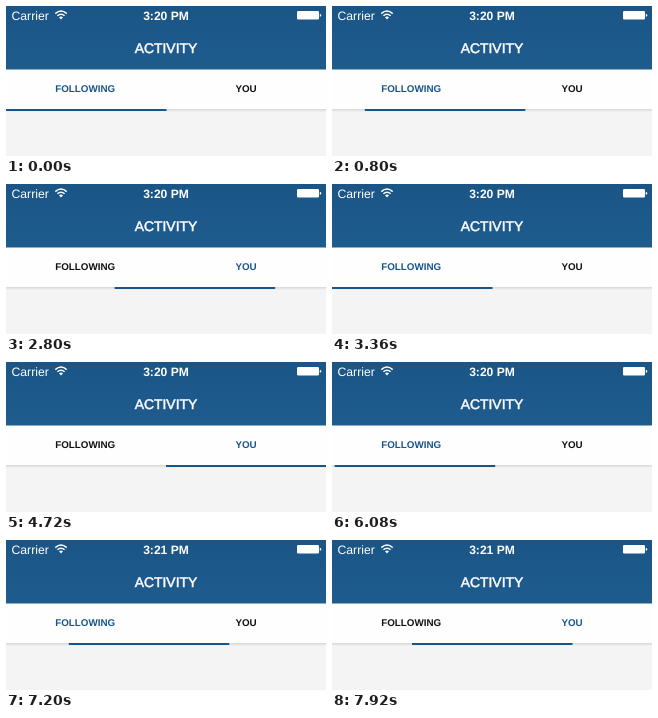
An HTML page that plays this animation: 320 by 150 pixels, repeating every 8 s.

```html
<!DOCTYPE html>
<html lang="en">
<head>
<meta charset="utf-8">
<title>Activity tabs</title>
<style>
  html, body { margin: 0; width: 100%; height: 100%; overflow: hidden; background: #f4f4f4; }
  svg { display: block; width: 100%; height: 100%; }
  text { font-family: "Liberation Sans", Arial, sans-serif; fill: #fff; text-rendering: geometricPrecision; }
  .mid { text-anchor: middle; }
  .medium { stroke: #fff; stroke-width: .5; }
  .tab { font-size: 9.8px; font-weight: bold; fill: #111; }
  .tab.active { fill: #17558a; }
</style>
</head>
<body>
<svg viewBox="0 0 320 150" preserveAspectRatio="none">
  <defs>
    <linearGradient id="header" x2="0" y2="1">
      <stop offset="0" stop-color="#1a5586"/>
      <stop offset="1" stop-color="#1f5c8e"/>
    </linearGradient>
    <linearGradient id="shadow" x2="0" y2="1">
      <stop offset="0" stop-color="#d6d6d6"/>
      <stop offset="1" stop-color="#f4f4f4"/>
    </linearGradient>
  </defs>
  <rect width="320" height="150" fill="#f4f4f4"/>
  <rect y="63" width="320" height="40" fill="#fefefe"/>
  <rect width="320" height="63.5" fill="url(#header)"/>
  <rect y="103" width="320" height="3" fill="url(#shadow)"/>

  <text x="5.5" y="14" font-size="12.2">Carrier</text>
  <g fill="none" stroke="#fff" stroke-width="1.5">
    <path d="M49.3 7.6Q55 2.4 60.7 7.6M51.4 9.8Q55 6.6 58.6 9.8"/>
    <path d="M53 11.2Q55 9.6 57 11.2L55 13.4Z" fill="#fff" stroke="none"/>
  </g>
  <text id="clock" class="mid" x="160" y="13.7" font-size="12.1" font-weight="bold">3:20 PM</text>
  <rect x="291" y="5" width="22" height="8.5" rx="1.2" fill="#fff"/>
  <path d="M313.8 7.7q1.4 .3 1.4 1.6t-1.4 1.6z" fill="#fff"/>

  <text class="mid medium" x="160" y="47" font-size="13.9">ACTIVITY</text>
  <text class="mid tab" x="79.2" y="86.4">FOLLOWING</text>
  <text class="mid tab" x="240" y="86.4">YOU</text>
  <rect id="bar" y="103" width="160.5" height="2" fill="#17558a"/>
</svg>
<script>
const LOOP = 8000, STEP = 80, TAB = 160, MINUTE_AT = 6640;

const linear = p => p;
const accelerate = p => p * p;
const smooth = p => p * p * (3 - 2 * p);
const settle = p => 1 - (1 - p) ** 2.5;
const swipe = p => 1 - (1 - p ** 1.5) ** 3.5;

// A move selects its tab once its progress reaches `commit`
const moves = [
  { start: 320, end: 1520, to: 82, ease: linear },
  { start: 1520, end: 1840, to: TAB, ease: settle, tab: 1, commit: .7 },
  { start: 2640, end: 3360, to: 0, ease: swipe, tab: 0, commit: .7 },
  { start: 4000, end: 4720, to: TAB, ease: swipe, tab: 1, commit: .7 },
  { start: 5000, end: 5360, to: 0, ease: smooth, tab: 0, commit: 0 },
  { start: 6000, end: 6880, to: 113, ease: smooth },
  { start: 6880, end: 7360, to: 0, ease: accelerate },
  { start: 7720, end: 8120, to: TAB, ease: smooth, tab: 1, commit: 0 }
];

const bar = document.getElementById('bar');
const clock = document.getElementById('clock');
const tabs = document.querySelectorAll('.tab');

function stateAt(t) {
  let x = 0, selected = 0;
  for (const { start, end, to, ease, tab, commit } of moves) {
    if (t < start) break;
    const p = Math.min(1, (t - start) / (end - start));
    x += (to - x) * ease(p);
    if (p >= commit) selected = tab;
  }
  return { x, selected };
}

function draw(now) {
  const t = Math.floor((now % LOOP) / STEP) * STEP;
  const { x, selected } = stateAt(t);
  bar.setAttribute('x', x);
  tabs.forEach((tab, i) => tab.classList.toggle('active', i === selected));
  clock.textContent = t < MINUTE_AT ? '3:20 PM' : '3:21 PM';
}

const start = performance.now();
function tick() {
  draw(performance.now() - start);
  requestAnimationFrame(tick);
}
tick();
</script>
</body>
</html>
```
